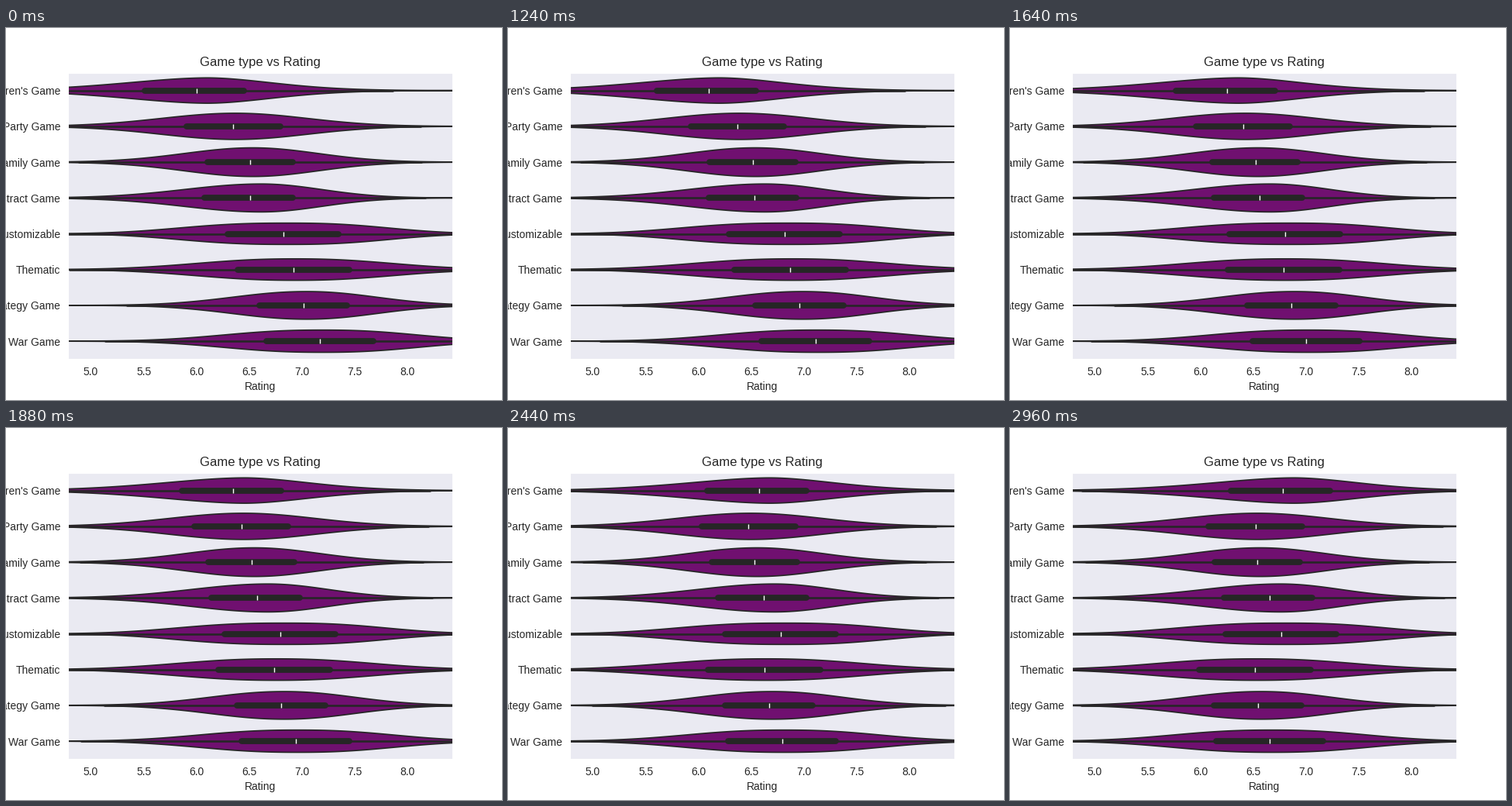
A matplotlib script that plays this animation: 640 by 480 pixels, repeating every 5000 ms.

```python
import numpy as np
import matplotlib.pyplot as plt
from matplotlib.animation import FuncAnimation
from matplotlib.patches import Polygon

INK = "#262626"
PURPLE = "#701070"
LW = 1.25
FRAMES, STEP_MS = 125, 40
HOLD, STEPS = 25, 49     # still frames first, then moving steps
AREA = 0.635             # every violin covers the same area
TIGHTEN = 0.95           # the smoothed outline is wider than the data

plt.rcParams.update({
    "font.family": "Liberation Sans", "font.size": 10, "axes.titlesize": 12,
    "axes.facecolor": "#EAEAF2", "axes.edgecolor": "white",
    "text.color": INK, "axes.labelcolor": INK,
    "xtick.color": INK, "ytick.color": INK,
    "xtick.bottom": False, "ytick.left": False,
    "lines.solid_capstyle": "round",
})


class Violin:
    """Two-sided bell of fixed shape that slides with its median."""

    def __init__(self, ax, row, medians, left, right, power):
        self.row, self.medians = row, medians
        x = np.linspace(-4, 4, 801)
        h = np.exp(-0.8 * np.abs(x / np.where(x < 0, left, right)) ** power)
        cdf = np.cumsum(h) / h.sum()
        q1, mid, q3 = np.interp([0.25, 0.5, 0.75], cdf, x)
        h *= AREA / (h.sum() * (x[1] - x[0]))

        # Everything below is measured from the median
        x = x - mid
        self.outline = np.column_stack([np.r_[x, x[::-1]],
                                        np.r_[row - h, row + h[::-1]]])
        self.quartiles = TIGHTEN * np.array([q1 - mid, q3 - mid])
        reach = 1.5 * np.ptp(self.quartiles)
        self.limits = self.quartiles + [-reach, reach]

        self.body = ax.add_patch(Polygon(self.outline, facecolor=PURPLE,
                                         edgecolor=INK, lw=LW, zorder=1))
        self.whisker, = ax.plot([], [], color=INK, lw=LW * 1.5)
        self.box, = ax.plot([], [], color=INK, lw=LW * 4.5)
        self.tick, = ax.plot([], [], "|", color="w", ms=LW * 3.75)

    def update(self, t):
        start, end = self.medians
        median = start + (end - start) * t
        self.body.set_xy(self.outline + [median, 0])
        self.whisker.set_data(median + self.limits, [self.row] * 2)
        self.box.set_data(median + self.quartiles, [self.row] * 2)
        self.tick.set_data([median], [self.row])


# name: first and last median, left and right width, flatness
GAMES = {
    "Children's Game": ((6.00, 6.78), 0.99, 0.79, 1.8),
    "Party Game": ((6.35, 6.52), 0.89, 0.86, 2.0),
    "Family Game": ((6.51, 6.54), 0.82, 0.78, 2.0),
    "Abstract Game": ((6.51, 6.655), 0.92, 0.72, 2.0),
    "Customizable": ((6.82, 6.765), 1.14, 1.06, 2.6),
    "Thematic": ((6.92, 6.515), 1.10, 1.07, 2.3),
    "Strategy Game": ((7.015, 6.545), 0.86, 0.81, 2.1),
    "War Game": ((7.17, 6.655), 1.07, 1.03, 2.4),
}

fig, ax = plt.subplots(figsize=(6.4, 4.8), dpi=100)
violins = [Violin(ax, row, *shape) for row, shape in enumerate(GAMES.values())]
ax.set_xlim(4.784, 8.423)
ax.set_ylim(len(GAMES) - 0.5, -0.5)
ax.set_xticks(np.arange(5, 8.5, 0.5))
ax.set_yticks(range(len(GAMES)), list(GAMES))
ax.set_xlabel("Rating")
ax.set_title("Game type vs Rating")


def draw(i):
    t = min(max(i - HOLD, 0), STEPS) / STEPS
    for violin in violins:
        violin.update(t)
    return []


anim = FuncAnimation(fig, draw, frames=FRAMES, interval=STEP_MS,
                     init_func=lambda: draw(0), repeat=True, repeat_delay=0)
plt.show()
```
